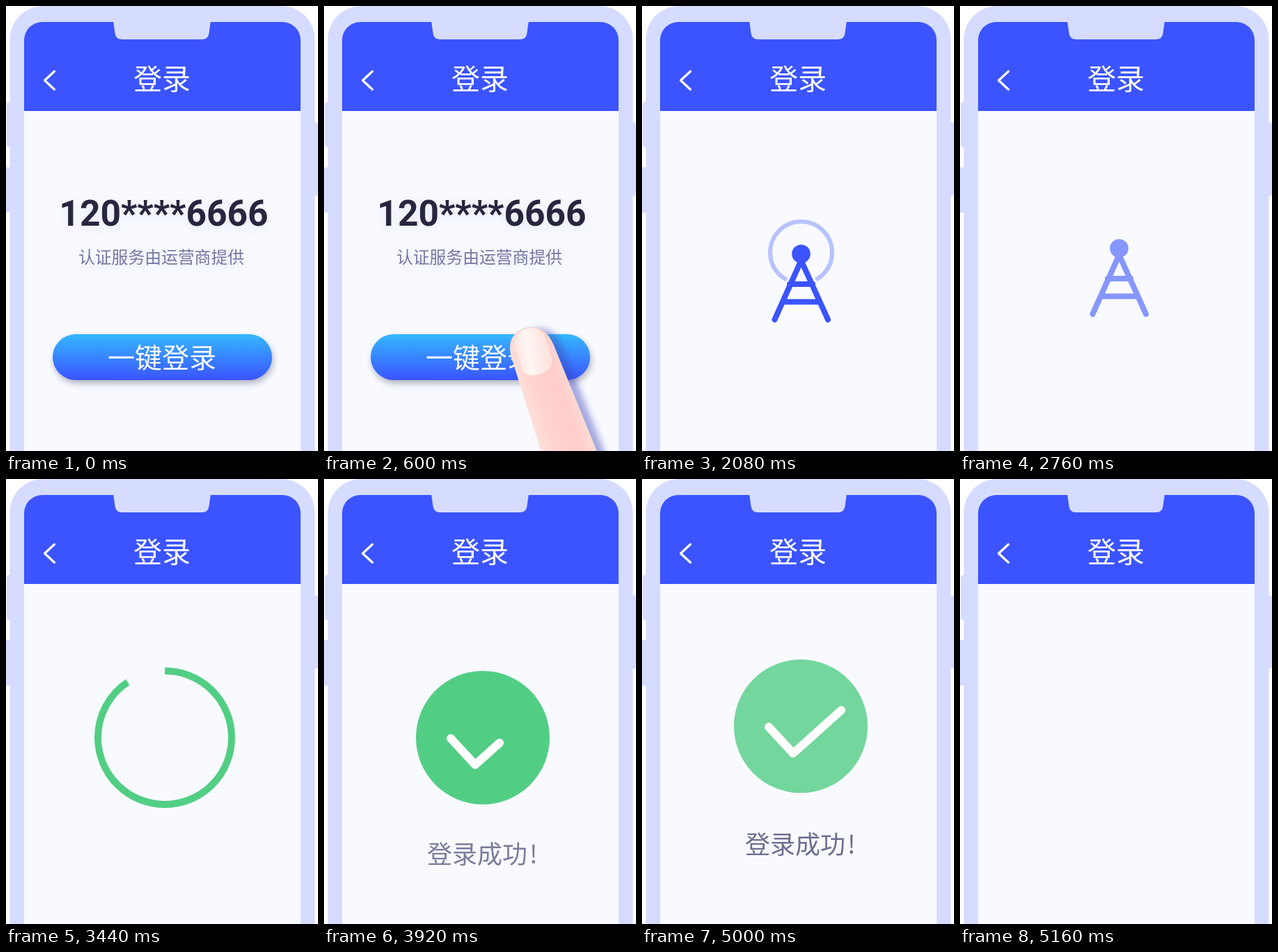
An HTML page for the animation above (5400 ms loop, 448x640 px).

```html
<!DOCTYPE html>
<html lang="zh-CN">
<head>
<meta charset="utf-8">
<title>一键登录</title>
<style>
  html, body { margin: 0; width: 100%; height: 100%; overflow: hidden; background: #fff; }
  svg { display: block; width: 100vw; height: 100vh; }
  text { font-family: "Noto Sans CJK SC", "Noto Sans CJK", sans-serif; }
  .mid { text-anchor: middle; }
  .num { font: 700 51.5px Roboto, sans-serif; fill: #28263e; }
  .glow { filter: drop-shadow(0 4px 8px rgba(110, 120, 190, .13)); }
  .line { fill: none; stroke-linecap: round; stroke-linejoin: round; }
</style>
</head>
<body>
<svg viewBox="0 0 448 640" preserveAspectRatio="none">
  <defs>
    <linearGradient id="blue" x2="0" y2="1">
      <stop stop-color="#35b7ff"/><stop offset="1" stop-color="#3b53ff"/>
    </linearGradient>
    <linearGradient id="skin" gradientUnits="userSpaceOnUse" x1="284" y1="570" x2="358" y2="544">
      <stop stop-color="#fde3dd"/><stop offset=".3" stop-color="#ffd3cf"/>
      <stop offset=".75" stop-color="#ffcdcb"/><stop offset="1" stop-color="#fddcd5"/>
    </linearGradient>
    <linearGradient id="nail" x1="0" y1="0" x2="1" y2=".25">
      <stop stop-color="#fbe0da"/><stop offset=".45" stop-color="#fff6f3"/><stop offset="1" stop-color="#fde3de"/>
    </linearGradient>
    <filter id="soft" x="-30%" y="-30%" width="160%" height="160%"><feGaussianBlur stdDeviation="5"/></filter>
    <clipPath id="screen"><rect x="26" y="23" width="397" height="700" rx="26"/></clipPath>
  </defs>

  <g fill="#d6dcff">
    <rect x="1" y="138" width="12" height="65" rx="4"/>
    <rect x="-3" y="232" width="16" height="65" rx="4"/>
    <rect x="436" y="167" width="12" height="106" rx="4"/>
    <rect x="5.5" y="0" width="438" height="760" rx="48"/>
  </g>
  <g clip-path="url(#screen)">
    <rect x="26" y="23" width="397" height="620" fill="#f8faff"/>
    <rect x="26" y="23" width="397" height="128" fill="#3b54ff"/>
  </g>
  <path d="M154 21L156.500 39Q157.500 48 167 48H281Q290.500 48 291.500 39L294 21Z" fill="#d6dcff"/>
  <path class="line" d="M69.500 94L55.500 107L69.500 120" stroke="#fff" stroke-width="3.2"/>
  <text class="mid" x="224" y="120" font-size="41" fill="#fff">登录</text>

  <g id="login">
    <g class="glow">
      <text class="num mid" x="226.500" y="316">120****6666</text>
      <text class="mid" x="223" y="370" font-size="23.8" fill="#7577a3">认证服务由运营商提供</text>
    </g>
    <g id="button">
      <rect x="69" y="477" width="315" height="66" rx="33" fill="#1c2440" opacity=".32" filter="url(#soft)"/>
      <rect x="67" y="472" width="315" height="66" rx="33" fill="url(#blue)"/>
      <text class="mid" x="224" y="520" font-size="39" fill="#fff">一键登录</text>
    </g>
  </g>

  <g id="finger">
    <path d="M322 680L269 505C262 479 275 464 297 463C314 462 326 474 332 490L408 680Z" transform="translate(11 1)" fill="#3d47b8" opacity=".45" filter="url(#soft)"/>
    <path d="M324 680L269 505C262 479 275 464 296 462C314 461 324 473 330 488L408 680Z" fill="url(#skin)"/>
    <path d="M-23 -13C-23 -29 -12 -34 0 -34S23 -29 23 -13V16C23 29 12 34 0 34S-23 29 -23 16Z" transform="translate(300 497) rotate(-18)" fill="url(#nail)"/>
  </g>

  <circle id="wave" cx="228.5" cy="354.500" fill="none" stroke="#3b54ff" stroke-width="6"/>
  <g id="tower">
    <path id="halo" class="line" d="M190.500 451L228.500 366L267 451M212 400H245M204 425.500H253L228.500 366Z" stroke="#fbfcff" stroke-width="15" style="fill:#fbfcff"/>
    <path class="line" d="M190.500 451L228.500 366L267 451M212 400H245M202 425.500H255" stroke="#3b54ff" stroke-width="8"/>
    <circle cx="228.5" cy="356.500" r="13.300" fill="#3b54ff"/>
  </g>

  <g id="done">
    <circle id="ring" cx="228" cy="372" r="96" fill="none" stroke="#52ce84" stroke-width="10" pathLength="360" transform="rotate(-90 228 372)"/>
    <circle id="disc" cx="228" cy="372" r="96" fill="#52ce84"/>
    <g id="drops" fill="#52ce84"></g>
    <path id="check" class="line" d="M182 373L217 411L286 349" stroke="#fff" stroke-width="12" pathLength="100"/>
    <text id="ok" x="148" y="555" font-size="36" font-weight="500" fill="#4a4b73">登录成功<tspan dx="3">!</tspan></text>
  </g>
</svg>
<script>
const LOOP = 5400, STEP = 40;
const $ = id => document.getElementById(id);
const span = (t, a, b) => Math.min(1, Math.max(0, (t - a) / (b - a)));
const mix = (a, b, p) => a + (b - a) * p;
const smooth = p => p * p * (3 - 2 * p);
const cubic = p => p < .5 ? 4 * p ** 3 : 1 - 4 * (1 - p) ** 3;

// value at time t along a table of [time, value]
function along(t, keys) {
  let v = keys[0][1];
  for (let i = 1; i < keys.length; i++) {
    const [a, x] = keys[i - 1], [b, y] = keys[i];
    if (t >= a) v = mix(x, y, smooth(span(t, a, b)));
  }
  return v;
}

function set(id, attrs) {
  const el = typeof id === "string" ? $(id) : id;
  for (const k in attrs) el.setAttribute(k, attrs[k]);
}

const slide = [[0, 200], [360, -7], [460, 2], [600, 0], [800, 200]];
const press = [[360, 1], [480, .95], [600, 1]];

// angle (deg), start distance, full radius, start time, duration
const drops = [
  [-62, 178, 10, 4040, 320],
  [135.3, 210, 18, 4013, 360],
  [90, 132, 14, 4290, 310],
  [-12, 150, 12, 4350, 290]
].map(([deg, far, size, start, len]) => {
  const el = document.createElementNS("http://www.w3.org/2000/svg", "circle");
  $("drops").append(el);
  const a = deg * Math.PI / 180;
  return { el, x: Math.cos(a), y: Math.sin(a), far, size, start, len };
});

function drawLogin(t) {
  const out = span(t, 1000, 1200);
  set("login", { opacity: 1 - out, transform: `translate(0 ${-45 * out})` });
  const s = along(t, press);
  set("button", { transform: `translate(224.500 505) scale(${s}) translate(-224.500 -505)` });
  const d = along(t, slide);
  set("finger", { transform: `translate(${d * .4} ${d})`, opacity: t >= 40 && t < 800 ? 1 : 0 });
}

function drawTower(t) {
  const show = span(t, 1200, 1410), hide = span(t, 2680, 2880);
  set("tower", {
    opacity: show * (1 - hide),
    transform: `translate(0 ${24 * (1 - show) - 20 * hide})`
  });
  set("halo", { opacity: show < 1 || hide ? 0 : 1 });
  const p = (t - 1400) % 440 / 440;
  const on = t >= 1400 && t < 2720;
  set("wave", { r: on ? mix(35.5, 52, p) : 0, opacity: on ? .73 * (1 - p) : 0 });
}

function drawDone(t) {
  const out = span(t, 4960, 5160);
  set("done", { opacity: 1 - out, transform: `translate(0 ${-82 * out})` });

  const arc = 360 * cubic(span(t, 2926, 3646));
  set("ring", {
    "stroke-dasharray": `${arc} 400`,
    "stroke-width": mix(10, 0, span(t, 3640, 3800)),
    opacity: arc > 0 && t < 3800 ? 1 : 0
  });
  set("disc", { opacity: span(t, 3600, 3760) });

  const tick = smooth(span(t, 3720, 4040));
  set("check", { "stroke-dasharray": `${100 * tick} 200`, opacity: tick > 0 ? 1 : 0 });

  const word = span(t, 3720, 4000);
  set("ok", { opacity: word, transform: `translate(0 ${-10 * (1 - smooth(word))})` });

  for (const d of drops) {
    const p = span(t, d.start, d.start + d.len);
    const dist = mix(d.far, 70, p * p);
    set(d.el, {
      cx: 228 + d.x * dist,
      cy: 372 + d.y * dist,
      r: p > 0 && p < 1 ? d.size * Math.min(1, .1 + 1.4 * p) : 0,
      opacity: Math.min(1, .35 + 3.5 * p)
    });
  }
}

const begin = performance.now();
function frame() {
  const t = Math.floor((performance.now() - begin) % LOOP / STEP) * STEP;
  drawLogin(t);
  drawTower(t);
  drawDone(t);
  requestAnimationFrame(frame);
}
frame();
</script>
</body>
</html>
```
